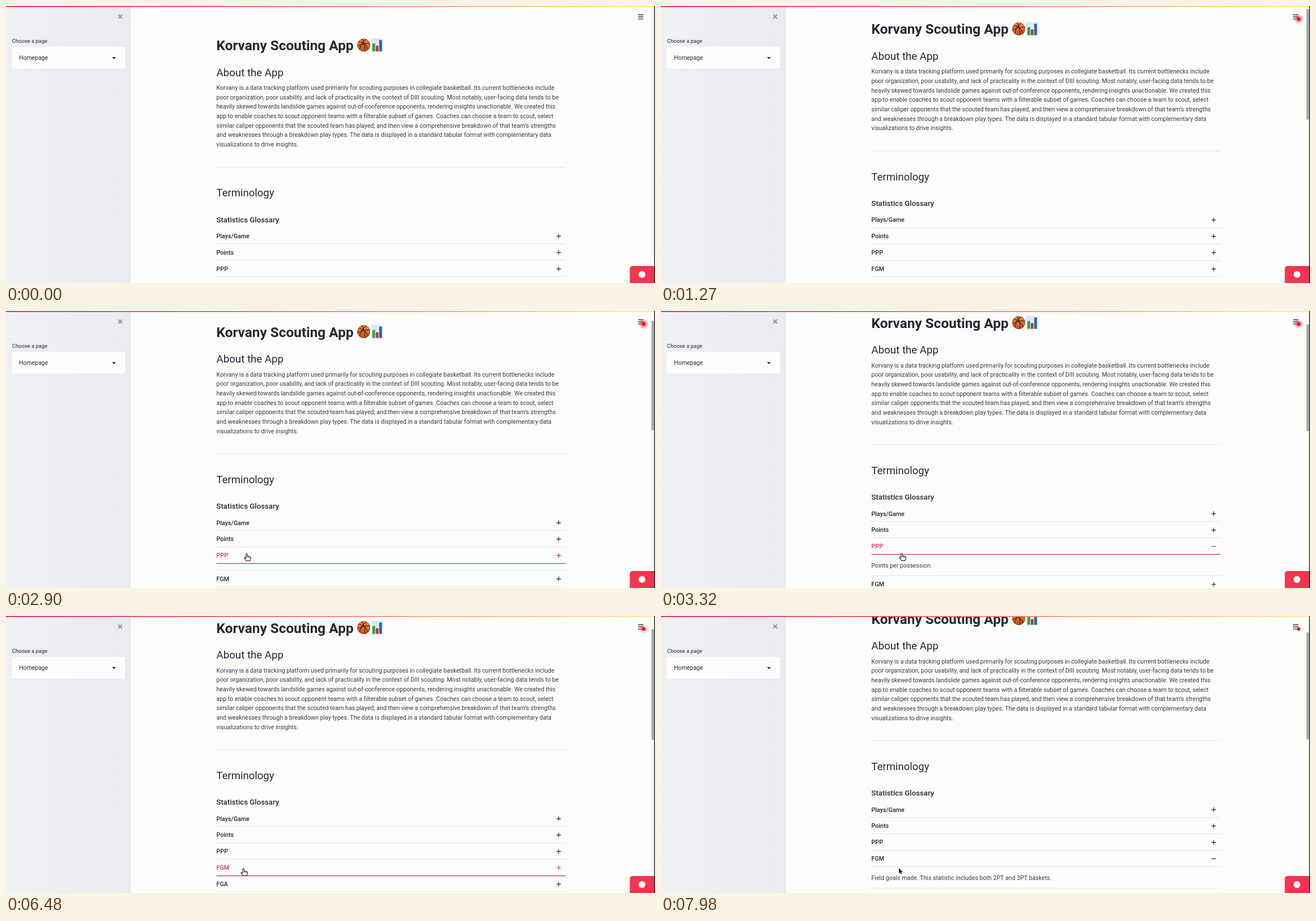
An HTML page with a canvas that plays this animation: 1146x489 px, repeating every 8 s.

```html
<!DOCTYPE html>
<html lang="en">
<head>
<meta charset="utf-8">
<title>Scouting app walkthrough</title>
<style>
html, body { margin: 0; width: 100%; height: 100%; overflow: hidden; background: #fdfdfc; }
canvas { display: block; width: 1146px; height: 489px; }
</style>
</head>
<body>
<canvas id="stage" width="1146" height="489"></canvas>
<script>
const ctx = document.getElementById('stage').getContext('2d');
const W = 1146, H = 489, LOOP = 8000;
const LEFT = 371.5, RIGHT = 988, ROW = 28.9;
const INK = '#262730', PINK = '#e22c68', RULE = '#e6e6ec';

const PARAGRAPH = [
  'Korvany is a data tracking platform used primarily for scouting purposes in collegiate basketball. Its current bottlenecks include',
  'poor organization, poor usability, and lack of practicality in the context of DIII scouting. Most notably, user-facing data tends to be',
  'heavily skewed towards landslide games against out-of-conference opponents, rendering insights unactionable. We created this',
  'app to enable coaches to scout opponent teams with a filterable subset of games. Coaches can choose a team to scout, select',
  'similar caliper opponents that the scouted team has played, and then view a comprehensive breakdown of that team’s strengths',
  'and weaknesses through a breakdown play types. The data is displayed in a standard tabular format with complementary data',
  'visualizations to drive insights.'
];

// Each track is a list of [time, value] stops.
const SCROLL = [[1200, 0], [1270, 28.6], [1430, 32.5], [3020, 32.5], [3250, 48.5], [7400, 48.5], [7620, 64.5]];
const OPEN_PPP = [[2840, 0], [3000, 1], [5480, 1], [5640, 0]];
const OPEN_FGM = [[7050, 0], [7210, 1]];
const CURSOR_X = [[1750, 462], [2120, 429], [2700, 425], [5700, 425], [6250, 419], [7980, 420]];
const CURSOR_Y = [[1750, 345], [2120, 420], [2400, 429], [3400, 428], [4300, 420], [5750, 420], [6250, 446], [7500, 445]];
const CURSOR_FROM = 1750;

const ITEMS = [
  { name: 'Plays/Game' },
  { name: 'Points' },
  { name: 'PPP', open: OPEN_PPP, body: 'Points per possession.' },
  { name: 'FGM', open: OPEN_FGM, body: 'Field goals made. This statistic includes both 2PT and 3PT baskets.' },
  { name: 'FGA' },
  { name: 'FG%' }
];

function track(stops, t) {
  if (t <= stops[0][0]) return stops[0][1];
  for (let i = 1; i < stops.length; i++) {
    const [t0, v0] = stops[i - 1], [t1, v1] = stops[i];
    if (t < t1) {
      const k = (t - t0) / (t1 - t0);
      return v0 + (v1 - v0) * k * k * (3 - 2 * k);
    }
  }
  return stops[stops.length - 1][1];
}

function text(str, x, y, size, weight = 400, color = INK) {
  ctx.font = `${weight} ${size}px Roboto, sans-serif`;
  ctx.fillStyle = color;
  ctx.fillText(str, x, y);
}

function box(x, y, w, h, color) {
  ctx.fillStyle = color;
  ctx.fillRect(x, y, w, h);
}

function rounded(x, y, w, h, radius, color) {
  ctx.fillStyle = color;
  ctx.beginPath();
  ctx.roundRect(x, y, w, h, radius);
  ctx.fill();
}

function disc(x, y, r, color) {
  ctx.fillStyle = color;
  ctx.beginPath();
  ctx.arc(x, y, r, 0, Math.PI * 2);
  ctx.fill();
}

function stroke(path, color, width) {
  ctx.strokeStyle = color;
  ctx.lineWidth = width;
  ctx.stroke(new Path2D(path));
}

function blend(stops, x0, y0, x1, y1) {
  const g = ctx.createLinearGradient(x0, y0, x1, y1);
  stops.forEach((c, i) => g.addColorStop(i / (stops.length - 1), c));
  return g;
}

function basketball(x, y) {
  disc(x, y, 11.2, blend(['#ee8a45', '#c4501c'], x, y - 11, x, y + 11));
  ctx.save();
  ctx.translate(x, y);
  stroke('M-11 2Q0 -4 11 -3M-3 -11Q3 0 2 11M-9 -6Q2 -5 8 8M4 -10Q-6 -2 -7 8', '#4a2113', 1.2);
  stroke('M-11 0A11 11 0 1 1 11 0A11 11 0 1 1 -11 0', '#7c3415', 0.7);
  ctx.restore();
}

function barChart(x, y) {
  rounded(x, y, 20.5, 24, 1, '#dce9f2');
  box(x + 2, y + 9, 4.8, 14, '#27a844');
  box(x + 8, y + 13, 4.8, 10, '#d92c2c');
  box(x + 14, y + 3, 4.8, 20, '#2467b8');
}

function glossary(t, scroll, hoverY) {
  let y = 391.5 - scroll;
  for (const { name, open, body } of ITEMS) {
    const shown = open ? track(open, t) : 0;
    const bottom = y + ROW;
    const hover = hoverY >= y && hoverY < bottom;
    const color = hover ? PINK : INK;
    text(name, LEFT, y + 18.5, 10.7, 500, color);
    const mid = y + 14.8;
    stroke(`M972 ${mid}h8` + (shown > 0.5 ? '' : `M976 ${mid - 4}v8`), color, 1.2);
    box(LEFT, Math.round(bottom) - 1, RIGHT - LEFT, hover ? 1.3 : 1, hover ? '#cf2f68' : RULE);
    y = bottom;
    if (shown > 0) {
      ctx.save();
      ctx.beginPath();
      ctx.rect(LEFT - 1, y, RIGHT - LEFT + 1, 38 * shown);
      ctx.clip();
      text(body, LEFT, y + 23, 10.6, 400, '#363842');
      ctx.restore();
      y += 38 * shown;
      box(LEFT, Math.round(y) - 1, RIGHT - LEFT, 1, RULE);
    }
  }
}

function page(t, scroll, hoverY) {
  ctx.save();
  ctx.translate(0, -scroll);
  text('Korvany Scouting App', LEFT, 78, 24.4, 700);
  basketball(631.7, 69);
  barChart(645, 57);
  text('About the App', LEFT, 123.5, 18.7);
  PARAGRAPH.forEach((line, i) => text(line, LEFT, 148 + i * 16.67, 10.6, 400, '#363842'));
  box(LEFT, 284, RIGHT - LEFT, 1, RULE);
  text('Terminology', LEFT, 336.3, 18.5);
  text('Statistics Glossary', LEFT, 381.5, 13.2, 500);
  ctx.restore();
  glossary(t, scroll, hoverY);
}

function sidebar() {
  box(0, 0, 220.5, H, blend(['#eef0f2', '#e9ebee'], 0, 0, 220, 0));
  stroke('M198.3 15.3l6.6 6.6m0 -6.6l-6.6 6.6', '#96989c', 2.1);
  text('Choose a page', 10.8, 64.7, 9.4);
  rounded(10.5, 72, 199.5, 38.5, 2, '#fdfdfd');
  text('Homepage', 23, 94.8, 10.45);
  ctx.fillStyle = INK;
  ctx.fill(new Path2D('M187.2 90.2h6.8l-3.4 3.6z'));
}

function chrome(t) {
  box(0, 0, W, 1.7, blend(['#e8195f', '#f4505f', '#fba46c', '#fdf57c'], 0, 0, W, 0));
  stroke('M1116 15.5h9.5M1116 19.2h9.5M1116 22.9h9.5', '#33343c', 1.4);

  if (t >= 300) {
    const glow = 0.5 - 0.5 * Math.cos(t * Math.PI / 1000);
    const halo = ctx.createRadialGradient(1126, 23, 2, 1126, 23, 9);
    halo.addColorStop(0, `rgba(255,20,40,${0.75 * glow})`);
    halo.addColorStop(1, 'rgba(255,20,40,0)');
    disc(1126, 23, 9, halo);
    disc(1126, 23, 3, '#f0101f');
  }
  if (t >= 1200) {
    const open = Math.max(track(OPEN_PPP, t), track(OPEN_FGM, t));
    const top = 5 + 0.37 * track(SCROLL, t - 70);
    rounded(1139.7, top, 4.6, 196 - 6.5 * open, 2.3, '#a9a9ac');
  }

  rounded(1101.5, 459, 43.5, 31, [5, 0, 0, 0], '#f5344e');
  disc(1123, 474, 6, '#ffffff');
  box(1144.5, 0, 1.5, H, '#2a2a2e');
}

function cursor(x, y, hand) {
  const shape = new Path2D(hand
    ? 'M-1.2 .8Q0 -.8 1.2 .8V4.6Q2.4 3.6 3.4 5Q4.7 4.2 5.5 5.6Q7.2 5 7.3 7V9.4L5.8 12.6H-.4L-4.2 7.8Q-3.8 6 -1.2 7.8Z'
    : 'M0 0V9.6L2.2 7.6L3.7 11L5.3 10.3L3.8 7H6.8Z');
  ctx.save();
  ctx.translate(x, y);
  ctx.lineJoin = 'round';
  ctx.lineWidth = hand ? 1.1 : 1.6;
  ctx.strokeStyle = hand ? '#222' : '#fff';
  ctx.fillStyle = hand ? '#fff' : '#111';
  if (hand) { ctx.fill(shape); ctx.stroke(shape); }
  else { ctx.stroke(shape); ctx.fill(shape); }
  if (hand) stroke('M1.2 4.6v2.6M3.4 5v2.4M5.5 5.6v2', '#222', 0.8);
  ctx.restore();
}

function draw(t) {
  const scroll = track(SCROLL, t);
  const x = track(CURSOR_X, t), y = track(CURSOR_Y, t);
  const present = t >= CURSOR_FROM;
  // The highlight trails the pointer slightly.
  const hoverY = present ? track(CURSOR_Y, t - 90) : -1;
  const bodyTop = 391.5 - scroll + 4 * ROW;
  const overBody = track(OPEN_FGM, t) > 0 && y >= bodyTop;

  box(0, 0, W, H, '#fdfdfc');
  page(t, scroll, hoverY);
  sidebar();
  chrome(t);
  if (present) cursor(x, y, y > 391.5 - scroll && !overBody);
}

const start = performance.now();
function frame() {
  draw((performance.now() - start) % LOOP);
  requestAnimationFrame(frame);
}
frame();
</script>
</body>
</html>
```
